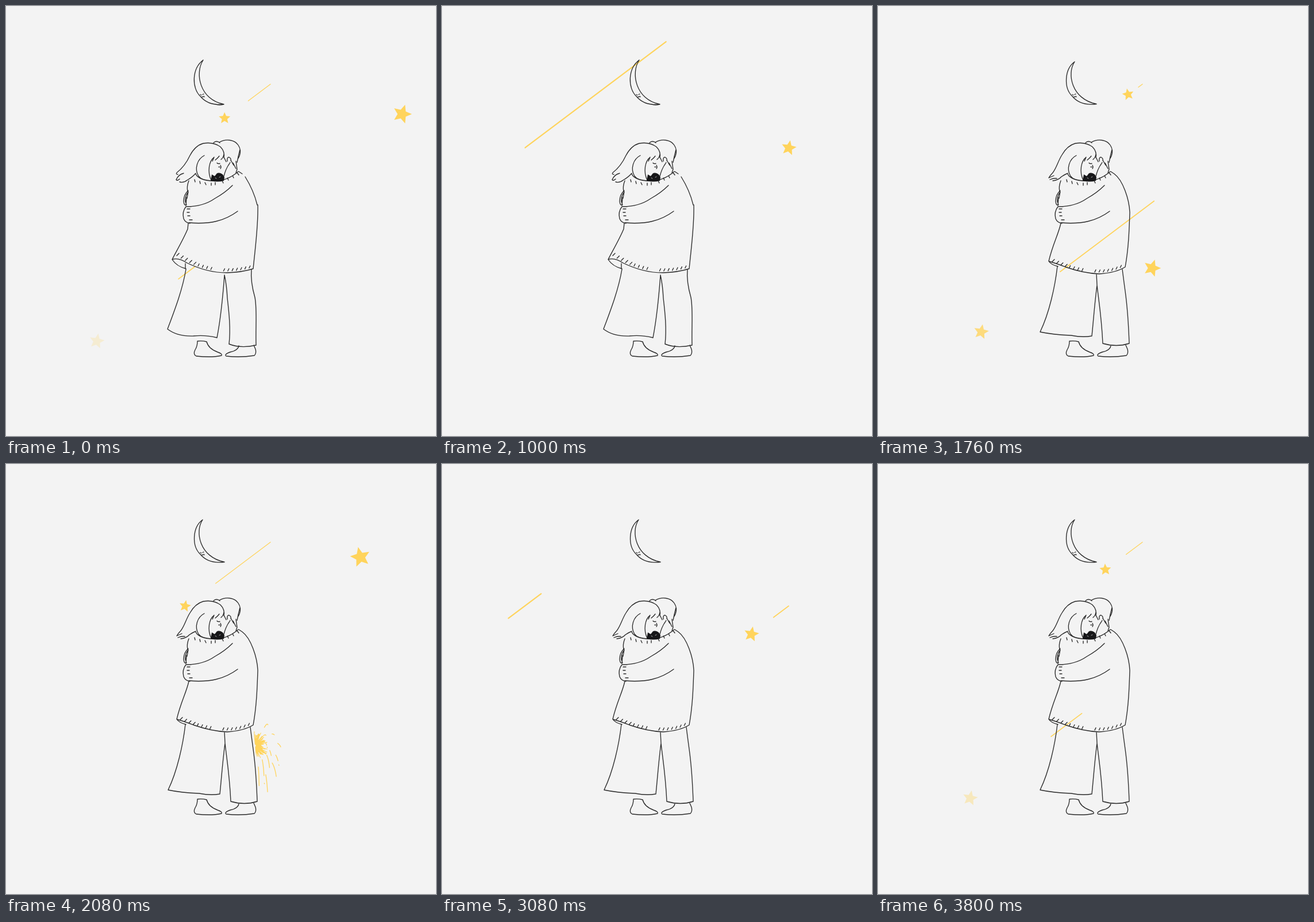
Recreate the animation shown at these times as an HTML page with a canvas. Size 748 px wide and 748 px high, loop 3.84 s.

```html
<!DOCTYPE html>
<html lang="en">
<head>
<meta charset="utf-8">
<title>Night hug</title>
<style>
html, body { margin: 0; width: 100%; height: 100%; overflow: hidden; background: #f3f3f3; }
canvas { display: block; width: 748px; height: 748px; }
</style>
</head>
<body>
<canvas id="stage" width="748" height="748"></canvas>
<script>
const ctx = document.getElementById('stage').getContext('2d');
const PAPER = '#f3f3f3', INK = '#2b2b2b', GOLD = '#ffd45c';
const STEP = 40, FRAMES = 96, CYCLE = 48, SLOPE = 0.755;

const clamp = v => Math.min(1, Math.max(0, v));
const wrap = v => ((v % CYCLE) + CYCLE) % CYCLE;
const easeQuad = u => { u = clamp(u); return u < 0.5 ? 2 * u * u : 1 - 2 * (1 - u) * (1 - u); };

function seeded(seed) {
  return () => (seed = (seed * 16807) % 2147483647) / 2147483647;
}

// Drawing parts

const heads = [
  'M379 264 Q381 253 373 245 Q361 236 343 239 Q329 243 320 260 C314 273 306 283 297 290 Q295 293 299 293',
  'M379 264 Q381 253 373 245 Q361 236 343 239 Q329 243 320 259 C313 270 311 281 304 290 Q300 294 297 299'
];
const hairTips = [
  'M309 291 Q300 293 296 302 Q297 305 302 301 M302 306 Q309 308 315 303 Q324 298 330 291',
  'M306 295 L297 299 M299 302 Q306 299 311 300 M304 304 Q314 303 319 297 Q325 293 330 291'
];
const hair = 'M345 260 C333 266 327 283 335 296 Q340 303 356 304 M362 263 C353 270 350 288 357 303' +
  ' M379 258 Q378 264 374 267 M371 261 Q368 265 364 268 M362 263 L359 270' +
  ' M361 238 Q366 233 372 238 M371 237 C383 230 398 233 404 242 Q410 251 406 261 L404 265 M407 250 L404 262 L402 272';
const face = 'M367 273 Q369 275 372 274 M373 277 Q375 280 373 283 M370 280 h2 M379 263 L383 271' +
  ' M385 270 Q384 263 388 263 Q392 265 391 269 M391 268 L396 277 M395 273 L400 283' +
  ' M400 270 L402 284 L400 290 M388 275 Q382 284 379 296 M390 272 L387 277';
const cat = 'M356 304 L358 293 L363 296 L367 291 Q372 289 377 293 L380 298 L379 304 Q368 307 356 304 Z';
const collar = 'M330 292 Q334 302 355 304 Q382 307 404 288 M405 288 L411 292' +
  ' M328 302 l1 4 M337 305 l1 4 M346 307 l2 4 M357 308 v4 M364 307 v4 M376 304 l2 4' +
  ' M385 299 l2 4 M394 295 l2 4 M402 290 l3 4';
const arms = 'M318 304 Q314 314 316 323 M317 321 Q309 328 309 340 Q310 348 314 346 Q311 339 315 334 L317 323' +
  ' M316 325 Q311 332 312 341 M314 333 L313 347' +
  ' M322 349 L313 349 Q306 358 309 370 Q312 377 320 378' +
  ' M313 349 Q343 349 363 335 Q381 325 394 312 M318 377 C355 380 380 374 403 357' +
  ' M315 353 h5 M315 359 h4 M316 365 h4 M319 372 h5';
const sweaters = [
  'M416 297 Q431 321 437 346 M438 346 C439 382 434 416 430 457 M317 378 L316 388 C308 407 296 427 289 441' +
  ' Q300 437 315 447 Q350 464 384 464 Q412 463 430 457 M289 441 Q297 453 313 457',
  'M411 292 C426 303 437 336 438 359 C437 389 436 421 430 454 M318 378 C314 397 304 414 297 444' +
  ' Q314 449 326 454 Q358 465 385 466 Q414 464 430 454 M297 444 Q301 450 313 453'
];
const trousers = [
  'M312 448 v9 M313 458 C307 494 293 530 281 562 Q298 575 326 574 Q348 572 367 577 C373 546 377 509 380 468' +
  ' M380 468 Q384 486 385 508 C388 534 391 561 388 588 Q408 596 435 590 C434 558 437 528 433 507 Q425 479 427 458',
  'M312 453 C308 488 298 534 282 567 Q306 572 336 573 Q356 577 372 574 C375 545 377 515 381 486 L380 466' +
  ' M381 486 C384 513 389 542 391 587 Q415 594 437 587 C436 559 434 525 430 496 Q427 474 425 458'
];
const feet = 'M333 583 Q341 582 349 584 Q352 596 368 602 Q377 605 375 608 Q358 612 331 609 Q325 606 329 598 Q333 592 333 583' +
  ' M405 591 Q404 599 390 602 Q379 606 383 609 Q407 612 432 608 Q436 604 434 597 L431 590';
const moons = [
  'M343 94 C323 109 323 143 338 157 Q352 174 379 171 M343 94 C328 117 337 163 379 171 Q371 173 365 171',
  'M342 97 C324 110 323 143 338 157 Q352 174 380 170.5 M342 97 C328 118 337 162 380 170.5'
];
const craters = 'M338 154 l2 1 M342 154 l2 -1 M341 158 h2 M344 157 l1 1';
const body = new Path2D('M371 237 Q402 230 407 252 L403 286 Q430 308 438 359 L430 456 L436 520 L436 588 L388 589' +
  ' L380 470 L370 575 L282 565 L312 455 L292 443 L317 380 L308 360 L318 304 L335 250 Z');

const hems = [
  { mid: 382, low: 464, left: 0.0037, right: 0.003, from: 297 },
  { mid: 385, low: 466, left: 0.0027, right: 0.006, from: 303 }
];

function hemTicks({ mid, low, left, right, from }) {
  let d = '';
  for (let x = from; x < 424; x += 7.4) {
    if (x > 361 && x < 371) continue;
    const y = low - (x < mid ? left : right) * (x - mid) ** 2;
    d += `M${x} ${y - 3} l${x < 330 ? 4 : 2} -4`;
  }
  return d;
}

const poses = [0, 1].map(i => new Path2D([heads[i], hairTips[i], hair, face, collar, arms,
  sweaters[i], trousers[i], feet, moons[i], craters, hemTicks(hems[i])].join(' ')));
const catShape = new Path2D(cat);

function drawCouple(pose) {
  ctx.strokeStyle = INK;
  ctx.lineWidth = 1.35;
  ctx.stroke(poses[pose]);
  ctx.fillStyle = '#171719';
  ctx.fill(catShape);
  ctx.strokeStyle = PAPER;
  ctx.lineWidth = 0.7;
  ctx.stroke(new Path2D('M364 299 l2 1 M371 298 l2 -1'));
}

// Stars and streaks

function drawStar(x, y, r, degrees, alpha = 1) {
  ctx.globalAlpha = alpha;
  ctx.fillStyle = GOLD;
  ctx.beginPath();
  for (let i = 0; i < 10; i++) {
    const a = (degrees + i * 36) * Math.PI / 180, d = i % 2 ? r * 0.46 : r;
    ctx.lineTo(x + d * Math.cos(a), y + d * Math.sin(a));
  }
  ctx.closePath();
  ctx.fill();
  ctx.globalAlpha = 1;
}

// Slow start, long glide, short stop; one knot every 7 frames.
const glideKnots = [0, 0.071, 0.264, 0.567, 0.925, 1];
function glide(age) {
  const i = Math.min(4, Math.floor(age / 7)), s = age / 7 - i;
  const at = k => glideKnots[Math.min(5, Math.max(0, k))];
  const m0 = (at(i + 1) - at(i - 1)) / 2, m1 = (at(i + 2) - at(i)) / 2;
  const s2 = s * s, s3 = s2 * s;
  return (2 * s3 - 3 * s2 + 1) * at(i) + (s3 - 2 * s2 + s) * m0 + (3 * s2 - 2 * s3) * at(i + 1) + (s3 - s2) * m1;
}

const gliders = [
  { start: 32.2, x: 509, y: 98, span: 387, r: 10.5, turn: 10, spin: 2.75 },
  { start: -3, x: 609, y: -103, span: 696, r: 17, turn: -14, spin: 2.75 },
  { start: 15, x: 676, y: 192, span: 522, r: 13.5, turn: 65, spin: 0 }
];

function drawGlider(g, frame) {
  const age = wrap(frame - g.start);
  if (age > 34.5) return;
  const d = glide(age) * g.span;
  const alpha = Math.min(clamp((age + 0.3) / 5), clamp((34.5 - age) / 7));
  drawStar(g.x - d, g.y + d * SLOPE, g.r, g.turn + g.spin * age, alpha);
}

const streaks = [
  { start: 24, x: 603, y: 247, span: 303, width: 1.7 },
  { start: 41, x: 460, y: 136, span: 227, width: 1.25 },
  { start: 5.6, x: 519, y: -35, span: 404, width: 2.2 }
];

function drawStreak(s, frame) {
  const age = wrap(frame - s.start);
  const head = easeQuad(age / 24) * s.span, tail = easeQuad((age - 14.6) / 12) * s.span;
  if (head - tail < 0.5) return;
  ctx.strokeStyle = GOLD;
  ctx.lineWidth = s.width;
  ctx.beginPath();
  ctx.moveTo(s.x - tail, s.y + tail * 0.752);
  ctx.lineTo(s.x - head, s.y + head * 0.752);
  ctx.stroke();
}

// Stars that fly in and burst behind the couple

const rockets = [
  { start: 0, hit: 7, x: 689, y: 188, tx: 435, ty: 380, r: 17, turn: 0 },
  { start: 34.6, hit: 46, x: 687, y: 296, tx: 432, ty: 490, r: 15.5, turn: 44 },
  { start: 49, hit: 61, x: 681, y: 113, tx: 423, ty: 309, r: 18, turn: 32 }
];

function drawCore(x, y, age) {
  const rand = seeded(77), size = Math.min(1, 0.4 + age * 0.2);
  ctx.lineWidth = 1.1;
  ctx.beginPath();
  for (let i = 0; i < 120; i++) {
    const a = i / 120 * Math.PI * 2, len = (11 + rand() * 14) * size;
    ctx.moveTo(x + Math.cos(a) * 3, y + Math.sin(a) * 3);
    ctx.lineTo(x + Math.cos(a) * len, y + Math.sin(a) * len);
  }
  ctx.stroke();
}

// Sparks shoot out radially; the lower ones drop faster.
function drawSparks(x, y, age) {
  const rand = seeded(41), count = 13;
  ctx.lineWidth = 1.3;
  ctx.beginPath();
  for (let i = 0; i < count; i++) {
    const k = i / (count - 1), a = -1.3 + k * 2.6;
    const reach = i % 2 ? 46 + rand() * 10 : 26 + rand() * 10;
    const fall = 0.04 + 0.55 * k * k * (0.6 + rand() * 0.4), trail = 1.3 + rand() * 1.5;
    const at = t => {
      const out = reach * (1 - Math.exp(-0.36 * t));
      return [x + Math.cos(a) * out, y + Math.sin(a) * out + fall * t ** 2.6];
    };
    for (let j = 5; j >= 0; j--) {
      const p = at(Math.max(0, age - j / 5 * trail));
      if (j === 5) ctx.moveTo(...p);
      else ctx.lineTo(...p);
    }
    if (i % 3 === 1) {
      const [px, py] = at(age + 0.8);
      ctx.moveTo(px, py);
      ctx.lineTo(px + 0.5, py + 1);
    }
  }
  ctx.stroke();
}

function drawRocket(r, frame) {
  if (frame < r.start) return;
  if (frame < r.hit) {
    const age = frame - r.start, p = age / (r.hit - r.start);
    drawStar(r.x + (r.tx - r.x) * p, r.y + (r.ty - r.y) * p, r.r, r.turn + age * 3);
    return;
  }
  const age = frame - r.hit;
  if (age > 11) return;
  ctx.strokeStyle = GOLD;
  ctx.globalAlpha = clamp((11 - age) / 3);
  drawCore(r.tx, r.ty, age);
  drawSparks(r.tx, r.ty, age);
  ctx.globalAlpha = 1;
}

function draw(frame) {
  ctx.fillStyle = PAPER;
  ctx.fillRect(0, 0, 748, 748);
  ctx.lineCap = ctx.lineJoin = 'round';
  rockets.forEach(r => drawRocket(r, frame));
  ctx.fillStyle = PAPER;
  ctx.fill(body);
  streaks.forEach(s => drawStreak(s, frame));
  gliders.forEach(g => drawGlider(g, frame));
  drawCouple((frame >> 2) & 1);
}

let begin;
function tick(now) {
  begin ??= now;
  draw(Math.floor((now - begin) / STEP) % FRAMES);
  requestAnimationFrame(tick);
}
draw(0);
requestAnimationFrame(tick);
</script>
</body>
</html>
```
